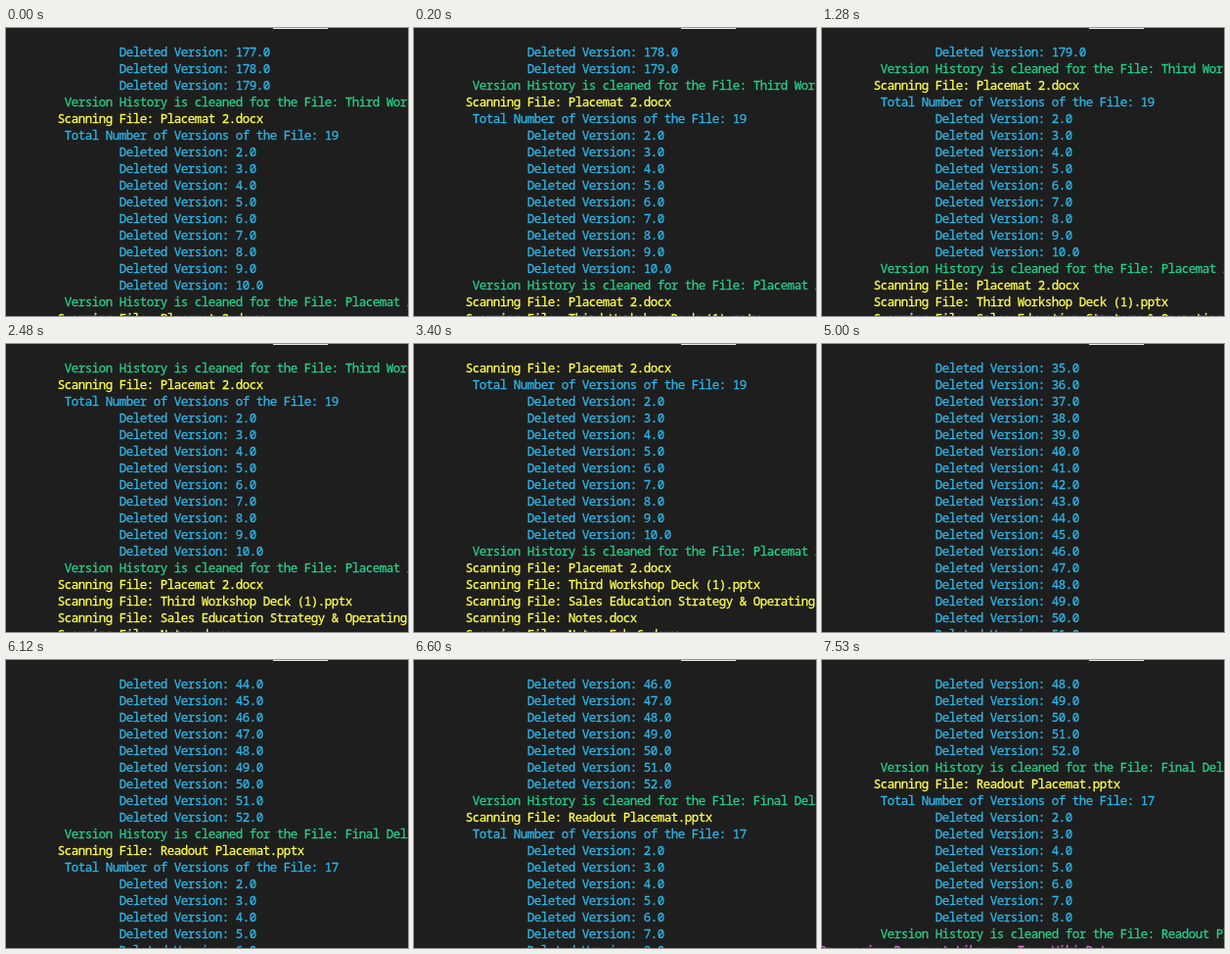
These frames come from a looping animation (411x294 px, 8 s). An HTML page with a canvas:

```html
<!DOCTYPE html>
<html lang="en">
<head>
<meta charset="utf-8">
<title>Version cleanup log</title>
<style>
  html, body { margin: 0; width: 100%; height: 100%; overflow: hidden; background: #1e1e1e; }
  canvas { display: block; }
</style>
</head>
<body>
<canvas id="stage" width="411" height="294"></canvas>
<script>
const ctx = document.getElementById('stage').getContext('2d');
const W = 411, H = 294, LOOP = 8000;
const COL = 7, ROW = 17, LEFT = -3, BASE = 29;
const CYAN = '#29b8eb', GREEN = '#23d18b', YELLOW = '#ffff4a', MAGENTA = '#d670d6';

const log = [];
const add = (col, color, text) => log.push({ x: LEFT + col * COL, color, text });
const scan = file => add(8, YELLOW, 'Scanning File: ' + file);
const total = n => add(9, CYAN, 'Total Number of Versions of the File: ' + n);
const cleaned = file => add(9, GREEN, 'Version History is cleaned for the File: ' + file);
const deleted = (from, to) => {
  for (let n = from; n <= to; n++) add(17, CYAN, `Deleted Version: ${n}.0`);
};

deleted(177, 179);
cleaned('Third Workshop Deck.pptx');
scan('Placemat 2.docx');
total(19);
deleted(2, 10);
cleaned('Placemat 2.docx');
scan('Placemat 2.docx');
scan('Third Workshop Deck (1).pptx');
scan('Sales Education Strategy & Operating Plan.docx');
scan('Notes.docx');
scan('Notes Feb 6.docx');
scan('Final Deliverable.pptx');
total(103);
const v0 = log.length - 2;   // log[v0 + n] is version n of this file
deleted(2, 52);
cleaned('Final Deliverable.pptx');
scan('Readout Placemat.pptx');
total(17);
deleted(2, 8);
cleaned('Readout Placemat.pptx');
add(0, MAGENTA, 'Processing Document Library: Team Wiki Data');

// [start in ms, log line at the top of the view]
const scroll = [
  [0, 0], [200, 1], [1280, 2], [2480, 3], [3400, 4], [3440, 5],
  [3520, v0 + 34], [5000, v0 + 35], [5120, v0 + 36],
  [6120, v0 + 44], [6520, v0 + 45], [6600, v0 + 46],
  [7120, v0 + 47], [7530, v0 + 48]
];

// Tight terminal tracking: one glyph per column
ctx.font = '12.5px "Noto Sans Mono", "DejaVu Sans Mono", monospace';
const tracking = COL - ctx.measureText('0').width;
ctx.letterSpacing = tracking + 'px';
ctx.lineWidth = 0.3;
ctx.lineJoin = 'round';

function draw(top) {
  ctx.fillStyle = '#1e1e1e';
  ctx.fillRect(0, 0, W, H);
  ctx.fillStyle = '#e7e7e7';
  ctx.fillRect(273, 0, 56, 1);
  log.slice(top, top + 17).forEach((line, i) => {
    const x = line.x + tracking / 2, y = BASE + i * ROW;
    ctx.fillStyle = ctx.strokeStyle = line.color;
    ctx.fillText(line.text, x, y);
    ctx.strokeText(line.text, x, y);
  });
}

function tick() {
  const t = performance.now() % LOOP;
  draw(scroll.filter(s => s[0] <= t).pop()[1]);
  requestAnimationFrame(tick);
}
tick();
</script>
</body>
</html>
```
